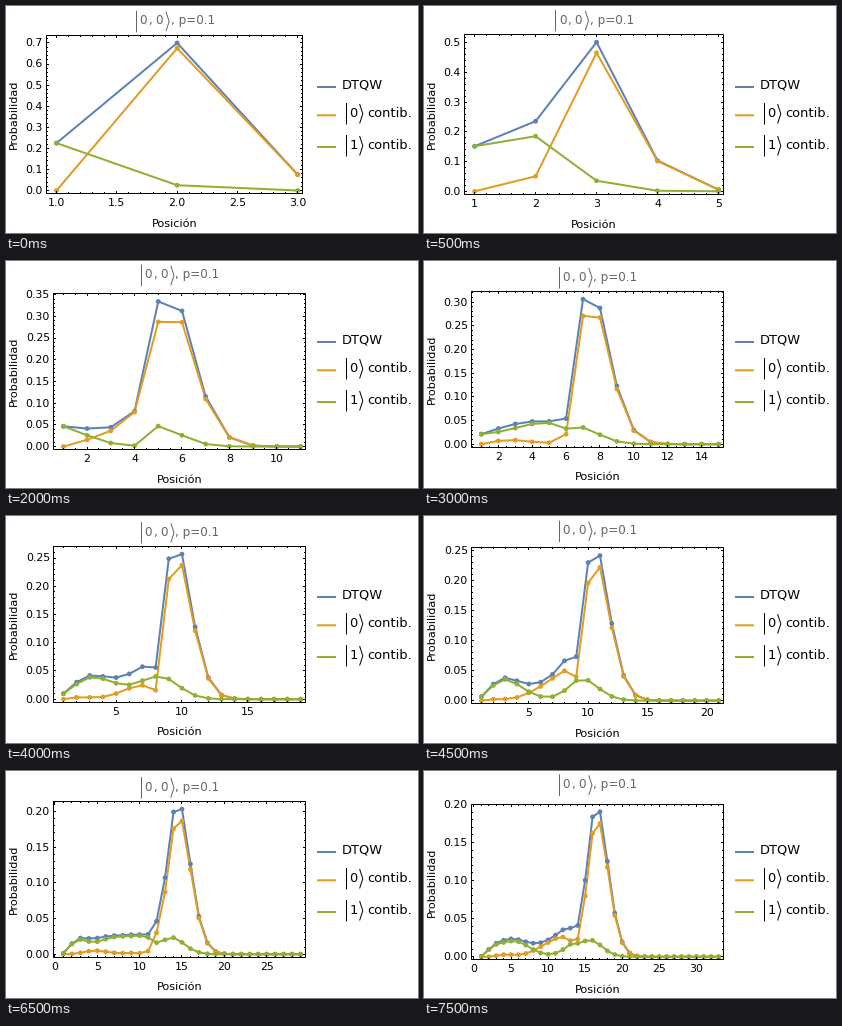
A matplotlib script that plays this animation: 412 by 227 pixels, repeating every 8000 ms.

```python
import math

import matplotlib.pyplot as plt
import numpy as np
from matplotlib.animation import FuncAnimation
from matplotlib.patches import Circle

W, H = 412, 227
FRAMES, INTERVAL = 16, 500
PX = 0.72  # points per pixel at 100 dpi
P = 0.1
BLUE, ORANGE, GREEN, GRAY = "#5e81b5", "#e19c24", "#8fb032", "#666666"
GOLDEN = (1 + math.sqrt(5)) / 2
PAD = 1 / 48
PAD_TOP = 0.0527

plt.rcParams["font.family"] = "DejaVu Sans"
fig = plt.figure(figsize=(W / 100, H / 100), dpi=100, facecolor="white")
ax = fig.add_axes([0, 0, 1, 1])


def walk(t):
    """Position probabilities per coin state after t steps."""
    a, b = math.sqrt(3) / 2, 0.5
    up, down = np.zeros(t + 1), np.zeros(t + 1)
    up[t] = 1
    for _ in range(t):
        up, down = a * up + b * down, np.roll(b * up - a * down, -1)
    drift = [math.comb(t, s) * P**s * (1 - P) ** (t - s) for s in range(t + 1)]
    return np.convolve(up**2, drift), np.convolve(down**2, drift)


def tick_step(span):
    """Smallest 1-2-5 step giving fewer than eight intervals."""
    for e in range(-3, 3):
        for m in (1, 2, 5):
            step = m * 10.0**e
            if span / step < 8:
                return step, 4 if m == 2 else 5


def multiples(lo, hi, step):
    eps = 1e-6
    first, last = math.ceil(lo / step - eps), math.floor(hi / step + eps)
    return np.arange(first, last + 1) * step


def decimals(step):
    return max(0, math.ceil(-math.log10(step) - 1e-9))


def mid(v):
    return math.floor(v) + 0.5


def line(xs, ys, color="black", width=1, z=4, **kw):
    ax.plot(xs, ys, color=color, lw=width * PX, zorder=z, snap=False, **kw)


def text(x, y, s, size, color="black", **kw):
    ax.text(x, y, s, fontsize=size * PX, color=color, va="baseline", **kw)


def ket_bars(x, right, y, color):
    line([mid(x)] * 2, [y - 10, y + 11.5], color, solid_capstyle="butt")
    line([right, right + 3.2, right], [y - 9, y + 0.8, y + 10.5], color,
         solid_capstyle="butt", solid_joinstyle="round")


def title(cx, y):
    x = cx - 38.5
    ket_bars(x, x + 29.8, y, GRAY)
    for dx, s in ((3.6, "0"), (12, ","), (18.8, "0"), (34.4, ", p=0.1")):
        text(x + dx, y + 3.8, s, 12, GRAY)


def legend():
    for y, color in ((81, BLUE), (109.3, ORANGE), (141, GREEN)):
        line([311, 330], [y, y], color, 2, solid_capstyle="butt")
    text(336, 83, "DTQW", 13)
    for y, digit in ((107, "0"), (139, "1")):
        ket_bars(340, 353.6, y, "black")
        text(343.4, y + 4, digit, 13)
        text(361, y + 4, "contib.", 13)


def draw(k):
    ax.clear()
    ax.set(xlim=(0, W), ylim=(H, 0))
    ax.axis("off")

    t = k + 1
    n = 2 * t + 1
    up, down = walk(t)
    total = up + down
    peak = total.max()

    # data ranges and ticks
    x_lo, x_hi = 1 - (n - 1) * 2 * PAD, n + (n - 1) * PAD
    y_lo, y_hi = -peak * PAD, peak * (1 + PAD_TOP) * 1.003
    x_step, x_sub = tick_step(x_hi - x_lo)
    y_step, y_sub = tick_step(peak * (1 + PAD + PAD_TOP))
    x_dec, y_dec = decimals(x_step), decimals(y_step)
    x_major = multiples(x_lo, x_hi, x_step)
    y_major = multiples(y_lo, y_hi, y_step)

    # frame box: tick labels decide how far it can reach
    left = 40.5 if y_dec == 1 else 47.5
    half = len(f"{x_major[-1]:.{x_dec}f}".replace(".", "")) * 3.5
    half += 1.75 if x_dec else 0
    inset = (x_hi - x_major[-1]) / (x_hi - x_lo)
    right = min(299.5, (300.5 - half - inset * left) / (1 - inset))
    width = right - left
    height = width / GOLDEN
    unit = height / (1 + PAD + PAD_TOP) / peak
    gap = peak * (1 + PAD_TOP) * unit - y_major[-1] * unit
    extra = max(0, 5.5 - gap)
    slack = 155.75 - height
    top = 30.5 + (slack + extra) / 2
    bottom = top + height
    cx = (left + right) / 2

    def px(v):
        return left + (v - x_lo) / (x_hi - x_lo) * width

    def py(v):
        return bottom - (v - y_lo) * unit

    # curves, then points
    pos = px(np.arange(1, n + 1))
    series = ((total, BLUE), (up, ORANGE), (down, GREEN))
    for values, color in series:
        line(pos, py(values), color, 2, 2, solid_joinstyle="round")
    for values, color in series:
        for xy in zip(pos, py(values)):
            ax.add_patch(Circle(xy, 2.4, color=color, lw=0, zorder=3))

    # frame and ticks on all four sides
    l, r, u, d = mid(left), mid(right), mid(top), mid(bottom)
    line([l, r, r, l, l], [u, u, d, d, u], solid_joinstyle="miter")
    style = dict(color="black", lw=PX, zorder=4, snap=False)
    minor = (multiples(x_lo, x_hi, x_step / x_sub),
             multiples(y_lo, y_hi, y_step / y_sub))
    for (xv, yv), size in (((x_major, y_major), 2.5), (minor, 1.5)):
        xs = [mid(x) for x in px(xv)]
        ys = [max(u, mid(y)) for y in py(yv)]
        ax.vlines(xs, d - size, d, **style)
        ax.vlines(xs, u, u + size, **style)
        ax.hlines(ys, l, l + size, **style)
        ax.hlines(ys, r - size, r, **style)

    for v in x_major:
        text(px(v), bottom + 12.6, f"{v:.{x_dec}f}", 11, ha="center")
    for v in y_major:
        text(left - 3.5, py(v) + 3.4, f"{abs(v):.{y_dec}f}", 11, ha="right")

    text(cx, bottom + 33.2, "Posición", 11.3, ha="center")
    text(10.5, (top + bottom) / 2, "Probabilidad", 11.3, ha="center",
         rotation=90, rotation_mode="anchor")
    title(cx, 16 + (slack - extra) / 2)
    legend()
    return []


anim = FuncAnimation(fig, draw, frames=FRAMES, interval=INTERVAL,
                     init_func=lambda: [], repeat=True, repeat_delay=0)
plt.show()
```
